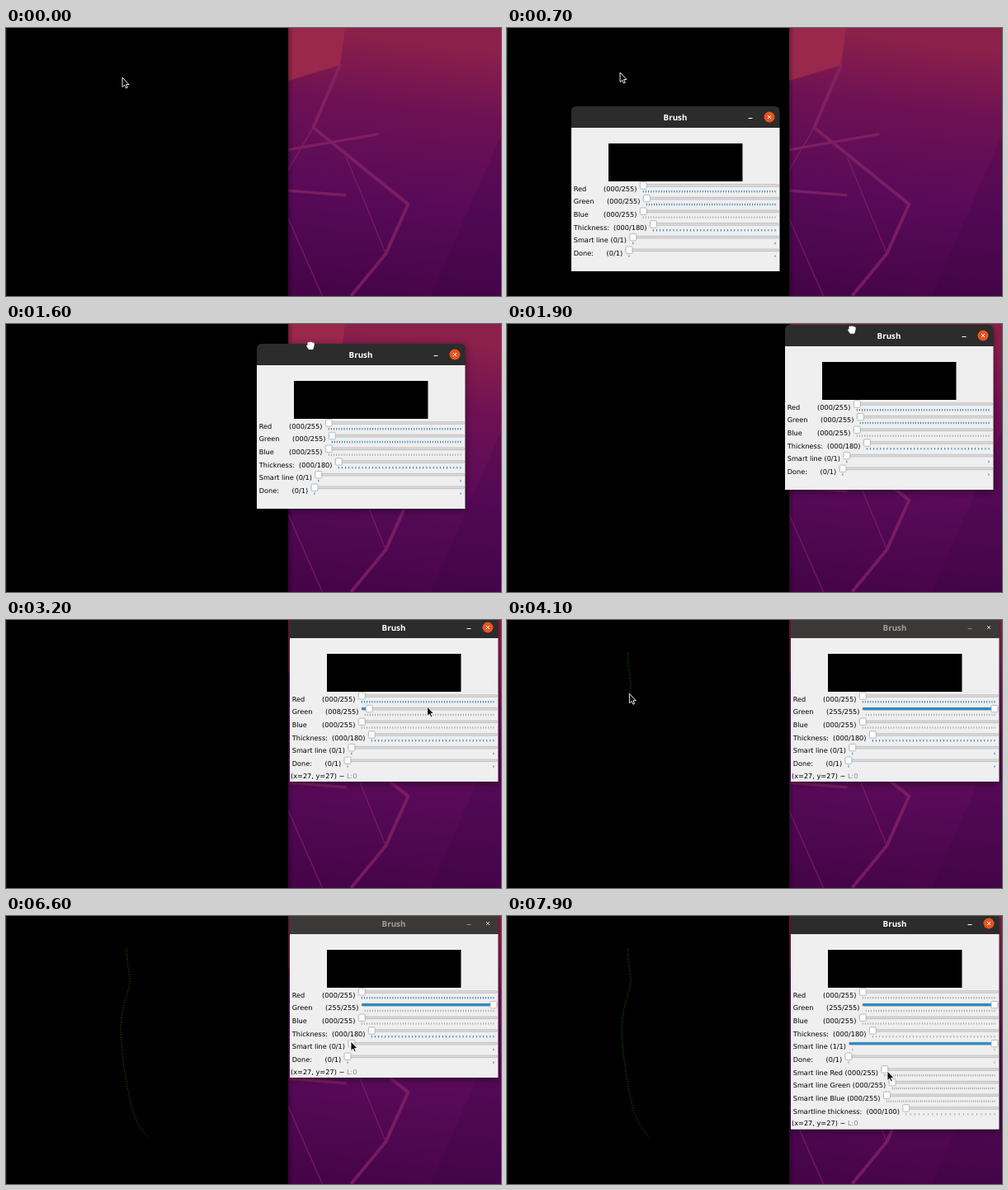
These frames come from a looping animation (600 by 325 pixels, 8 s). An HTML page:

```html
<!DOCTYPE html>
<html lang="en">
<head>
<meta charset="utf-8">
<title>Brush settings</title>
<style>
  html, body { margin: 0; width: 100%; height: 100%; overflow: hidden; background: #000; }
  svg { display: block; width: 600px; height: 325px; }
  text { font: 8.2px "DejaVu Sans", sans-serif; fill: #000; white-space: pre; text-rendering: geometricPrecision; }
  .title { font: bold 9.8px "Open Sans", sans-serif; text-anchor: middle; fill: #fff; }
  .bar { fill: #2c2c2c; }
  .glyph { stroke: #fff; fill: none; }
  .blurred .bar { fill: #3b3a39; }
  .blurred .title { fill: #a09e9b; }
  .blurred .glyph { stroke: #d8d6d3; }
  .blurred .minimise { stroke: #8a8886; }
  .blurred .disc { display: none; }
  .groove { fill: #dcdcdc; stroke: #a8a8a8; stroke-width: .6; }
  .fill { fill: #308cc6; stroke: #2a79ab; stroke-width: .6; }
  .knob { fill: #fbfbfb; stroke: #aaa; stroke-width: .8; }
  .ticks { stroke-width: 2.4; fill: none; }
  #panel { filter: drop-shadow(0 2px 4px rgba(0, 0, 0, .5)); }
</style>
</head>
<body>
<svg viewBox="0 0 600 325">
  <defs>
    <linearGradient id="sky" x1=".1" y1="0" x2="0" y2="1">
      <stop offset="0" stop-color="#8b204a"/>
      <stop offset=".25" stop-color="#6e1154"/>
      <stop offset=".6" stop-color="#580a59"/>
      <stop offset="1" stop-color="#440446"/>
    </linearGradient>
    <linearGradient id="edge">
      <stop offset="0" stop-opacity=".3"/>
      <stop offset="1" stop-opacity="0"/>
    </linearGradient>
    <clipPath id="drawn"><rect id="drawnArea" width="342" height="0"/></clipPath>
  </defs>

  <rect x="342" width="258" height="325" fill="url(#sky)"/>
  <path d="M600 130L515 325H600Z" fill="#30003a" opacity=".16"/>
  <path d="M342 0H411L405 45L342 64Z" fill="#99284c"/>
  <g fill="none" stroke="#8d2768" opacity=".66" transform="translate(.4 -.3)">
    <path d="M405 44L372 121L487 214L460 274L418 325" stroke-width="4"/>
    <path d="M342 148L451 129M342 197.5L412 203" stroke-width="3.4"/>
    <path d="M372 121L342 172M412 157L460 274M342 232L383 325" stroke-width="1.3"/>
  </g>
  <rect x="342" width="6" height="325" fill="url(#edge)"/>
  <rect width="342" height="325"/>
  <rect width="1" height="325" fill="#1c1c1c"/>

  <path id="stroke" clip-path="url(#drawn)" fill="none" stroke="#0a960a" stroke-dasharray="1 2"
    d="M146.5 40Q147 60 150.5 77Q149 90 145 100Q139 120 139 140Q142 190 152 230Q158 254 172 268"/>

  <g id="panel">
    <path id="body" fill="#efefef"/>
    <path class="bar" d="M0 26V6Q0 0 6 0H246.500Q252.500 0 252.500 6V26Z"/>
    <text class="title" x="126" y="16.800">Brush</text>
    <circle class="disc" cx="240" cy="13" r="6.500" fill="#e95420"/>
    <path class="glyph minimise" d="M214.500 14.500h5"/>
    <path class="glyph" d="M238 11l4 4m0-4l-4 4"/>
    <rect x="45" y="45" width="162.500" height="46"/>
    <g id="rows"></g>
    <text id="status" x="1">(x=27, y=27) ~ <tspan fill="#8c8c8c">L:0</tspan></text>
  </g>

  <path id="arrow" d="M0 0V11.500L2.700 9.200L4.500 13L6.300 12.200L4.600 8.500H8Z" fill="#0a0a0a" stroke="#fff" stroke-width=".9"/>
  <path id="hand" d="M-5 0L-3.500-.5V-3.500Q-2.500-4.800-1.500-3.500Q-.5-5.500.6-3.800Q2-5 2.600-3.300Q4.600-4 4.800-1.500L4 2.500L3 5H-2L-4.500 1.500Z" fill="#fff"/>
</svg>

<script>
const LOOP = 8000, STEP = 100, ROW = 15.67, KNOB_END = 247;
const BLUE = '#2f7cb0', GREY = '#a0a0a0';
const GRAB = 1200, RELEASE = 2200, STATUS = 2700, SLIDE = 3100, SLID = 3600;
const DRAW = 3900, DRAWN = 4850, TOGGLE = 6800, EXPAND = 6900, LAG = 95;

const $ = id => document.getElementById(id);
const easeOut = u => 1 - (1 - u) ** 3;
const clamp = u => Math.min(1, Math.max(0, u));

// Stops are [time, x, y]; every leg starts fast and settles.
function glide(stops, t) {
  const next = stops.findIndex(stop => stop[0] > t);
  if (next < 1) return stops.at(next).slice(1);
  const [t0, ...from] = stops[next - 1], [t1, ...to] = stops[next];
  const p = easeOut((t - t0) / (t1 - t0));
  return from.map((v, n) => v + (to[n] - v) * p);
}

const panelStops = [[GRAB, 78, 95], [1300, 96, 84], [1400, 260, 56], [2300, 344, -4]];
const arrivalStops = [
  [200, 141, 60], [400, 137, 54], [700, 137, 54], [GRAB, 166, 106], [RELEASE, 425, 4],
  [2500, 425, 4], [2900, 434, 105], [SLIDE, 434, 105], [SLID, 591, 105], [DRAW, 146, 40]
];
const returnStops = [
  [DRAWN, 172, 268], [5200, 423, 161], [5900, 416, 155], [6200, 416, 155],
  [6600, 418, 152], [7100, 418, 152], [7900, 461, 188]
];

function pointerAt(t) {
  if (t < DRAW) return glide(arrivalStops, t);
  if (t >= DRAWN) return glide(returnStops, t);
  const progress = (t - DRAW) / (DRAWN - DRAW);
  const point = $('stroke').getPointAtLength(progress * $('stroke').getTotalLength());
  return [point.x, point.y];
}

function add(parent, tag, attrs) {
  const el = document.createElementNS('http://www.w3.org/2000/svg', tag);
  for (const key in attrs) el.setAttribute(key, attrs[key]);
  return parent.appendChild(el);
}

// The label's width decides where its slider begins.
function makeRow([label, max], i) {
  const g = add($('rows'), 'g', { transform: `translate(0 ${99.7 + i * ROW})` });
  const text = add(g, 'text', { x: 2.7, y: 3 });
  const write = n => {
    text.textContent = `${label}(${String(n).padStart(String(max).length, '0')}/${max})`;
  };
  write(0);
  const start = text.getComputedTextLength() + 10.5;
  const span = KNOB_END - start;
  const pitch = span / Math.max(1, max / 5);
  const track = { x: start - 4, y: -5, height: 2.6, rx: 1 };
  const ticks = add(g, 'path', {
    class: 'ticks', d: `M${start - .5} 3.6h${span + 1}`, 'stroke-dasharray': `1 ${pitch - 1}`
  });
  add(g, 'rect', { ...track, class: 'groove', width: span + 8.5 });
  const fill = add(g, 'rect', { ...track, class: 'fill' });
  const knob = add(g, 'rect', { class: 'knob', y: -8, width: 8, height: 8.5, rx: 1.5 });

  return (n, color, visible) => {
    write(n);
    const offset = span * n / max;
    knob.setAttribute('x', start - 4 + offset);
    fill.setAttribute('width', offset);
    show(fill, n > 0);
    ticks.style.stroke = color;
    show(g, visible);
  };
}

function move(el, [x, y]) { el.setAttribute('transform', `translate(${x} ${y})`); }
function show(el, on) { el.style.display = on ? '' : 'none'; }

const rows = [
  ['Red        ', 255], ['Green      ', 255], ['Blue       ', 255], ['Thickness:  ', 180],
  ['Smart line ', 1], ['Done:      ', 1], ['Smart line Red ', 255], ['Smart line Green ', 255],
  ['Smart line Blue ', 255], ['Smartline thickness:  ', 100]
].map(makeRow);

function render(t) {
  const pointer = pointerAt(t);
  const grabbing = t >= GRAB && t <= RELEASE;
  const expanded = t >= EXPAND;
  const height = 200 + (expanded ? 4 * ROW : 0);

  show($('panel'), t >= 700);
  move($('panel'), glide(panelStops, t).map(Math.round));
  $('panel').classList.toggle('blurred', t >= DRAW && t < TOGGLE);
  $('body').setAttribute('d', `M0 26H252.5V${height}H0Z`);
  show($('status'), t >= STATUS);
  $('status').setAttribute('y', height - 4.3);

  // The green slider trails the pointer by a short delay.
  const green = Math.round(255 * easeOut(clamp((t - LAG - SLIDE) / (SLID - SLIDE))));
  rows.forEach((update, i) => {
    const value = i === 1 ? green : i === 4 ? Number(t >= TOGGLE) : 0;
    const grey = expanded || i === 2 || (i === 1 && t >= STATUS);
    update(value, grey ? GREY : BLUE, i < 6 || expanded);
  });

  $('drawnArea').setAttribute('height', t < DRAW ? 0 : t < DRAWN ? pointer[1] : 325);
  show($('hand'), grabbing);
  show($('arrow'), !grabbing);
  move($(grabbing ? 'hand' : 'arrow'), pointer);
}

const began = performance.now();
function tick() {
  const t = (performance.now() - began) % LOOP;
  render(Math.floor(t / STEP) * STEP);
  requestAnimationFrame(tick);
}
tick();
</script>
</body>
</html>
```
